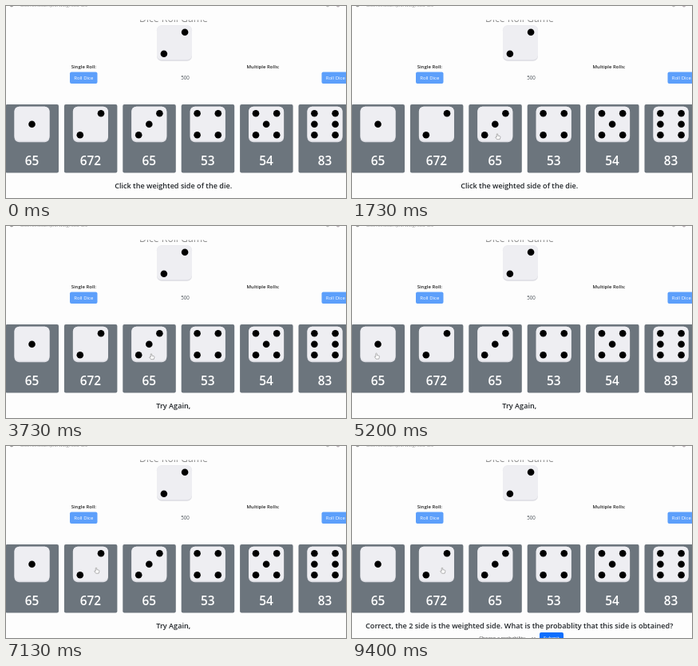
An HTML page with a canvas for the animation above (9470 ms loop, 426 by 240 pixels).

```html
<!DOCTYPE html>
<html lang="en">
<head>
<meta charset="utf-8">
<title>Weighted die</title>
<style>
  html, body { margin: 0; width: 100%; height: 100%; overflow: hidden; background: #fdfdfd; }
  canvas { display: block; width: 426px; height: 240px; }
</style>
</head>
<body>
<canvas id="stage" width="426" height="240"></canvas>
<script>
const ctx = document.getElementById('stage').getContext('2d');
const LOOP = 9470;
const COUNTS = [65, 672, 65, 53, 54, 83];
const CARD_STEP = 73.4;

const MESSAGES = [
  [0, 'Click the weighted side of the die.'],
  [2700, 'Try Again,'],
  [8900, 'Correct, the 2 side is the weighted side. What is the probablity that this side is obtained?']
];
const ASK_AT = 8900;

// Pointer stops: time, x, y
const POINTER = [
  [500, 236, 250], [1300, 182, 159.5], [4000, 182, 159.5], [4800, 30.5, 159],
  [5700, 30.5, 159], [6600, 113, 152], [LOOP, 113, 152]
];

function text(str, x, y, size, color, weight = 400, align = 'center') {
  ctx.font = `${weight} ${size}px "Open Sans", "Noto Sans", sans-serif`;
  ctx.fillStyle = color;
  ctx.textAlign = align;
  ctx.fillText(str, x, y);
}

function box(x, y, w, h, r, color) {
  ctx.fillStyle = color;
  ctx.beginPath();
  ctx.roundRect(x, y, w, h, r);
  ctx.fill();
}

function dot(x, y, r, color) {
  ctx.fillStyle = color;
  ctx.beginPath();
  ctx.arc(x, y, r, 0, Math.PI * 2);
  ctx.fill();
}

function pips(n) {
  const spots = n % 2 ? [[0, 0]] : [];
  if (n > 1) spots.push([1, -1], [-1, 1]);
  if (n > 3) spots.push([-1, -1], [1, 1]);
  if (n === 6) spots.push([-1, 0], [1, 0]);
  return spots;
}

function die(n, cx, cy) {
  box(cx - 22, cy - 22, 44, 44.5, 6, '#dcdce2');
  box(cx - 22, cy - 22, 44, 43, 6, '#eeeef2');
  for (const [dx, dy] of pips(n)) dot(cx + dx * 13.1, cy + dy * 13.5, 4.3, '#000');
}

function button(x, y, w, h, label, color, baseline) {
  box(x, y, w, h, 2, color);
  text(label, x + w / 2, baseline, 6, '#fff', 500);
}

function browserEdge() {
  dot(7, -1, 2.2, '#999');
  text('diceroll.example/weighted-die', 18, 0.5, 6, '#999', 400, 'left');
  dot(403, -0.8, 2, '#bbb');
  dot(416, -0.8, 2.2, '#b9b0b6');
}

// Only the foot of the heading shows below the page edge.
function title() {
  ctx.save();
  ctx.beginPath();
  ctx.rect(150, 17.5, 120, 6);
  ctx.clip();
  text('Dice Roll Game', 210, 20.3, 12.2, '#888', 500);
  ctx.restore();
}

function controls() {
  text('Single Roll:', 97.3, 78, 6, '#222', 600);
  text('Multiple Rolls:', 322, 78, 6, '#222', 600);
  button(80, 82.5, 34.5, 14.5, 'Roll Dice', '#5c9ffb', 92);
  button(395.5, 82.5, 34.5, 14.5, 'Roll Dice', '#5c9ffb', 92);
  text('500', 224.5, 92, 6.2, '#495057');
}

function cards() {
  COUNTS.forEach((count, i) => {
    const x = i * CARD_STEP;
    box(x - 0.5, 123, 66.5, 85.5, 2, '#6c757d');
    die(i + 1, x + 32.5, 147.8);
    text(count, x + 32.5, 199.3, 15.4, '#fff', 600);
  });
}

function question() {
  text('Choose a probability', 188, 242.2, 6, '#444');
  ctx.strokeStyle = '#555';
  ctx.lineWidth = 0.8;
  ctx.beginPath();
  ctx.moveTo(225.5, 239);
  ctx.lineTo(227.5, 241);
  ctx.lineTo(229.5, 239);
  ctx.stroke();
  button(235, 233, 30, 14.5, 'Submit', '#0d6efd', 242.2);
}

function pointerAt(t) {
  const next = POINTER.findIndex(p => p[0] >= t);
  if (next < 1) return null;
  const [t0, x0, y0] = POINTER[next - 1];
  const [t1, x1, y1] = POINTER[next];
  const u = (t - t0) / (t1 - t0);
  const e = u * u * (3 - 2 * u);
  return [x0 + (x1 - x0) * e, y0 + (y1 - y0) * e];
}

function hand(x, y) {
  ctx.save();
  ctx.translate(x, y);
  ctx.scale(0.9, 0.9);
  ctx.fillStyle = '#fff';
  ctx.strokeStyle = '#888';
  ctx.lineWidth = 0.7;
  ctx.lineJoin = 'round';
  ctx.beginPath();
  ctx.moveTo(-0.8, 0.6);
  ctx.quadraticCurveTo(0, -0.5, 0.8, 0.6);
  ctx.lineTo(0.9, 3);
  ctx.lineTo(3.7, 3.5);
  ctx.quadraticCurveTo(4.5, 3.8, 4.3, 5.2);
  ctx.lineTo(3.5, 8);
  ctx.lineTo(-0.4, 8);
  ctx.lineTo(-2.6, 5);
  ctx.quadraticCurveTo(-2.2, 3.8, -0.8, 5);
  ctx.closePath();
  ctx.fill();
  ctx.stroke();
  ctx.restore();
}

function draw(t) {
  box(0, 0, 426, 240, 0, '#fdfdfd');
  browserEdge();
  title();
  die(2, 211, 46.3);
  controls();
  cards();
  const message = MESSAGES.filter(m => m[0] <= t).pop()[1];
  text(message, 209.7, 227.5, 9.1, '#212529', 600);
  if (t >= ASK_AT) question();
  const pointer = pointerAt(t);
  if (pointer) hand(...pointer);
}

const start = performance.now();
function tick() {
  draw((performance.now() - start) % LOOP);
  requestAnimationFrame(tick);
}
tick();
</script>
</body>
</html>
```
